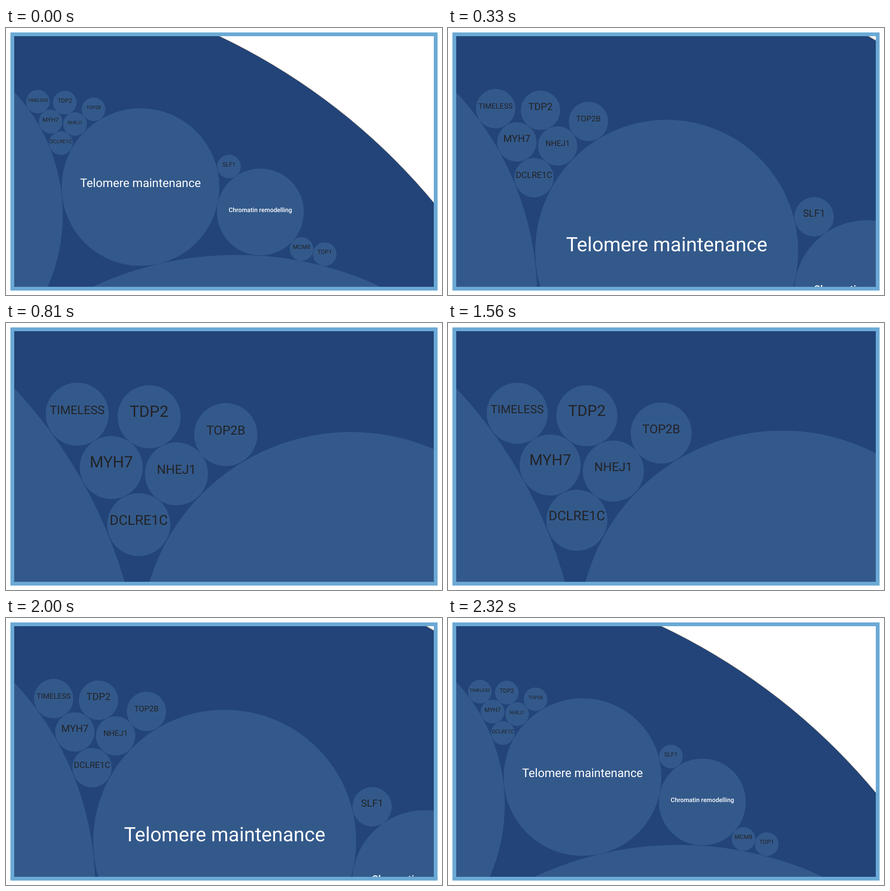
These frames come from a looping animation (956 by 586 pixels, 3770 ms). An HTML page:

```html
<!DOCTYPE html>
<html lang="en">
<head>
<meta charset="utf-8">
<title>Zooming bubble chart</title>
<style>
  html, body { margin: 0; width: 100%; height: 100%; overflow: hidden; background: #fff; }
  svg { display: block; }
  text { font-family: Roboto, Arial, sans-serif; text-anchor: middle; text-rendering: geometricPrecision; }
</style>
</head>
<body>
<svg width="956" height="586">
  <rect x="9.7" y="9.7" width="936.6" height="566.6" fill="#6ba9d5"/>
  <svg x="18" y="18" width="920" height="550" viewBox="18 18 920 550">
    <rect x="18" y="18" width="920" height="550" fill="#fff"/>
    <g id="chart"></g>
  </svg>
</svg>
<script>
const chart = document.getElementById('chart');
const LOOP = 3770, STEP = 40, STEPS = 20;

function add(tag, attrs, text = '') {
  const el = document.createElementNS('http://www.w3.org/2000/svg', tag);
  for (const key in attrs) el.setAttribute(key, attrs[key]);
  el.textContent = text;
  chart.append(el);
}

function bubble(cx, cy, r, label, size, fill = '#222326', weight = 400) {
  add('circle', { cx, cy, r, fill: '#33598b' });
  if (label) add('text', { x: cx, y: cy, fill, 'font-size': size, 'font-weight': weight }, label);
}

add('circle', { cx: -124.5, cy: 1265.4, r: 1381, fill: '#224479', stroke: '#b79b78', 'stroke-width': 0.8 });
bubble(-270.5, 410, 395);
bubble(506, 1247, 749);
bubble(294.9, 349.2, 172.9, 'Telomere maintenance', 26, '#fff');
bubble(557.8, 403.8, 95.2, 'Chromatin remodelling', 13.6, '#fff', 500);

const genes = [
  ['TIMELESS', 69.8, 161.6, 9.8], ['TDP2', 128.9, 163.7, 13], ['TOP2B', 192, 178.4, 10.4],
  ['MYH7', 97.8, 205.5, 13], ['NHEJ1', 151.4, 210.7, 10.4], ['DCLRE1C', 120.4, 252.5, 11.3],
  ['SLF1', 488.9, 304, 13], ['MCM8', 648, 485, 13], ['TOP1', 698.8, 496.3, 13]
];
for (const [name, x, y, size] of genes) bubble(x, y, 25.9, name, size);

// Number of zoom steps taken since a start time
const stepsSince = (t, start) => Math.max(0, Math.min(STEPS, Math.floor((t - start) / STEP)));

function draw() {
  const t = performance.now() % LOOP;
  const scale = 1 + (stepsSince(t, 10) - stepsSince(t, 1520)) / 12;
  chart.setAttribute('transform', `translate(18 138.5) scale(${scale}) translate(-18 -138.5)`);
  requestAnimationFrame(draw);
}
draw();
</script>
</body>
</html>
```
